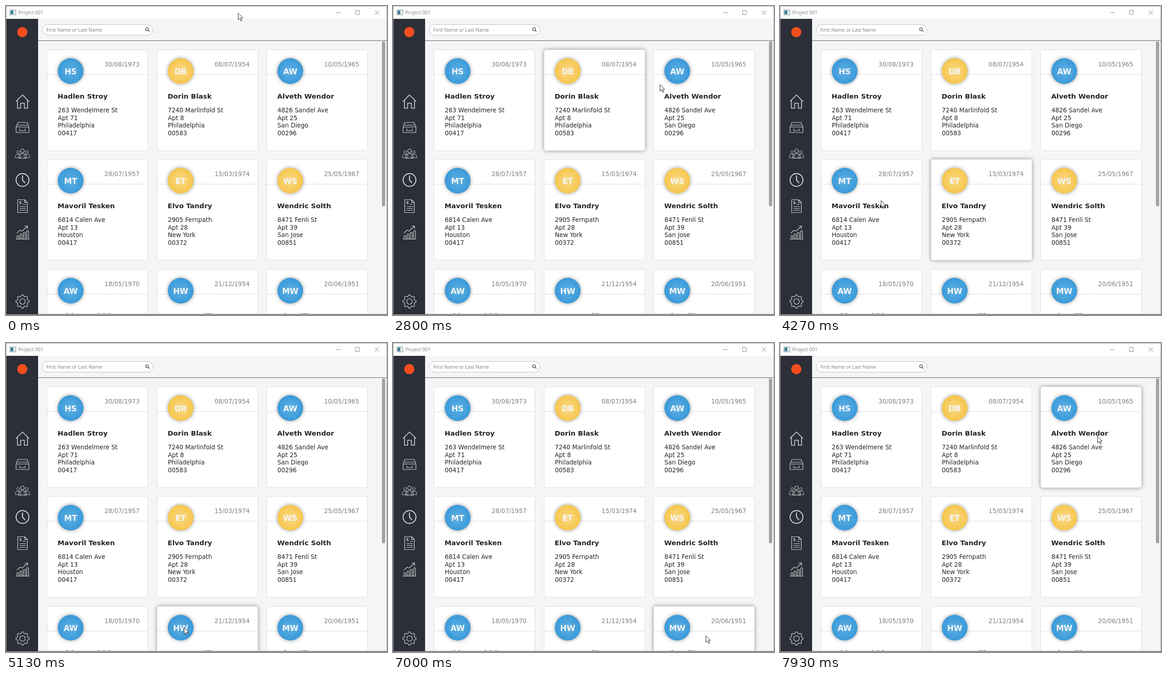
Animation of 831x674 px, one loop 8 s. Source, as an HTML page:

```html
<!DOCTYPE html>
<html lang="en">
<head>
<meta charset="utf-8">
<title>Project 001</title>
<style>
  html, body { margin: 0; width: 100%; height: 100%; overflow: hidden; background: #f4f5f7; }
  svg { display: block; }
  text { font-family: "DejaVu Sans", Verdana, sans-serif; }
  .ui { font: 10.5px "Open Sans", sans-serif; fill: #7c7c7c; }
  .panel { fill: #fff; stroke: #dcdde0; }
  .panel.hover { filter: drop-shadow(0 0 4px rgba(0, 0, 0, .4)); }
  .rule { stroke: #dcdde0; }
  .badge { filter: drop-shadow(0 0 4px rgba(0, 0, 0, .4)); }
  .initials { font-size: 17px; font-weight: bold; fill: #f4f5f7; text-anchor: middle; }
  .date { font-size: 13.3px; fill: #808080; text-anchor: end; }
  .name { font-size: 14.9px; font-weight: bold; fill: #23242a; }
  .address { font-size: 13.2px; fill: #23242a; }
  .icons { fill: none; stroke: #d8d9dc; stroke-width: 1.2; stroke-linecap: round; stroke-linejoin: round; }
  .icons .bold { stroke-width: 2; }
  .buttons { fill: none; stroke: #858585; }
</style>
</head>
<body>
<svg width="831" height="674" viewBox="0 0 831 674">
  <defs>
    <radialGradient id="blue"><stop stop-color="#5fb0e3"/><stop offset="1" stop-color="#3a9ad9"/></radialGradient>
    <radialGradient id="yellow"><stop stop-color="#fad986"/><stop offset="1" stop-color="#f6c64d"/></radialGradient>
    <clipPath id="content"><rect x="70" y="76" width="760" height="595"/></clipPath>
    <g id="person"><circle cy="-6" r="4"/><path d="M-8 10V7q0-7 8-7t8 7v3z"/></g>
  </defs>

  <rect width="831" height="674" fill="#f4f5f7"/>
  <g id="cards" clip-path="url(#content)"></g>
  <rect x="820" y="77" width="7" height="360" rx="3.5" fill="#a2a2a2"/>

  <!-- Title bar -->
  <rect width="831" height="28" fill="#fff"/>
  <rect x="8.5" y="8.5" width="13" height="11" fill="#e9eef0" stroke="#8b9296"/>
  <rect x="10" y="10" width="6" height="8" fill="#397f98"/>
  <text class="ui" x="27" y="18">Project 001</text>
  <path class="buttons" d="M720 14.5h10m32.5-5h8v9h-8zM804 9.5l9.5 9.5m0-9.5l-9.5 9.5"/>

  <!-- Search -->
  <path d="M70 75.5h760" stroke="#555a57"/>
  <rect x="79.5" y="40.5" width="241" height="23" rx="11.5" fill="#fff" stroke="#bcbdbf"/>
  <text class="ui" x="88" y="56">First Name or Last Name</text>
  <g fill="none" stroke="#444" stroke-width="1.3">
    <circle cx="307.7" cy="50.7" r="3.1"/><path d="M310 53l3 3"/>
  </g>

  <!-- Sidebar, each icon drawn around its own centre -->
  <rect y="28" width="70" height="644" fill="#2d2f38"/>
  <circle cx="35.5" cy="57" r="11" fill="#f24e1e"/>
  <g class="icons">
    <g transform="translate(36 208)"><path stroke-width="1.6" d="M-14 0L0-14 14 0M-11-2v17h7V4h8v11h7V-2"/></g>
    <g transform="translate(36 265)"><path d="M-14-1l4-10h20l4 10v12h-28zh28M-10-5h20M-6 3v4H6V3"/></g>
    <g transform="translate(36 322)">
      <use href="#person"/>
      <use href="#person" transform="translate(-9.500 1) scale(.75)"/>
      <use href="#person" transform="translate(9.500 1) scale(.75)"/>
    </g>
    <g transform="translate(36 379.500)" class="bold"><circle r="14"/><path d="M0-9V0l5 6"/></g>
    <g transform="translate(36 436.500)">
      <path d="M-10.500-14h15l6 6v22h-21zM4.500-14v6h6M1-4h6M-6 1H7M-6 5H7M-6 9H7M-3-10q-3-1-3 1t3 2-3 2"/>
    </g>
    <g transform="translate(36 494)"><path id="chart"/></g>
    <g transform="translate(36 644.500)"><circle r="6"/><path id="gear"/></g>
  </g>

  <!-- Window frame -->
  <path d="M.5 0v674M0 .5h831M830.5 0v674" stroke="#a6a6a6" fill="none"/>
  <path d="M0 672.5h831" stroke="#454745"/>
  <path d="M0 673.5h831" stroke="#c5c6c6"/>

  <path id="cursor" d="M.5.5V15l3.400-3.200 2.500 5.700 2.200-1L6.100 11h4.600z" fill="#fff" stroke="#24242c"/>
</svg>

<script>
const people = [
  ["Hadlen Stroy", "30/08/1973", "blue", "263 Wendelmere St", "Apt 71", "Philadelphia", "00417"],
  ["Dorin Blask", "08/07/1954", "yellow", "7240 Marlinfold St", "Apt 8", "Philadelphia", "00583"],
  ["Alveth Wendor", "10/05/1965", "blue", "4826 Sandel Ave", "Apt 25", "San Diego", "00296"],
  ["Mavoril Tesken", "28/07/1957", "blue", "6814 Calen Ave", "Apt 13", "Houston", "00417"],
  ["Elvo Tandry", "15/03/1974", "yellow", "2905 Fernpath", "Apt 28", "New York", "00372"],
  ["Wendric Solth", "25/05/1967", "yellow", "8471 Fenli St", "Apt 39", "San Jose", "00851"],
  ["Arlden Wolthims", "18/05/1970", "blue"],
  ["Hosten Wilk", "21/12/1954", "blue"],
  ["Mio Wilke", "20/06/1951", "blue"],
];
const size = 220, pitch = 239.5;
const cardLeft = i => 89.5 + Math.ceil(i % 3 * pitch);
const cardTop = i => 95.5 + Math.floor(Math.floor(i / 3) * pitch);

const cardMarkup = ([name, date, color, ...address], i) => {
  const initials = name.split(" ").map(word => word[0]).join("");
  const lines = address.map((line, n) =>
    `<text class="address" x="23.5" y="${136.5 + n * 16.6}">${line}</text>`).join("");
  return `<g transform="translate(${cardLeft(i)} ${cardTop(i)})">
    <rect class="panel" width="${size}" height="${size}" rx="4.5"/>
    <path class="rule" d="M0 54h${size}"/>
    <circle class="badge" cx="51.5" cy="46.5" r="28" fill="url(#${color})"/>
    <text class="initials" x="51.5" y="53">${initials}</text>
    <text class="date" x="202" y="36.5">${date}</text>
    <text class="name" x="23" y="106">${name}</text>${lines}</g>`;
};
const byId = id => document.getElementById(id);
byId("cards").innerHTML = people.map(cardMarkup).join("");

// Rising bars under an arrow
const bars = Array.from({ length: 4 }, (_, i) => `M${7 * i - 12} 14v${-7 - 3.5 * i}h4v${7 + 3.5 * i}`);
byId("chart").setAttribute("d", `M-14 14.5h28${bars.join("")}M-12 1l7-6 4 2 12-11m-6 0h6v6`);

// Eight-toothed gear outline
const gear = Array.from({ length: 32 }, (_, i) => {
  const angle = (i - 0.5) * Math.PI / 16, radius = i % 4 < 2 ? 14.5 : 11.5;
  return `${radius * Math.cos(angle)} ${radius * Math.sin(angle)}`;
});
byId("gear").setAttribute("d", `M${gear.join("L")}Z`);

// Pointer moves: start tick, end tick and destination, at 15 ticks per second
const start = [506, 15];
const moves = [
  [11, 21, 198, 165], [34, 37, 460, 171], [40, 44, 704, 171], [49, 53, 704, 419],
  [56, 60, 443, 419], [62, 64, 220, 424], [70, 74, 275, 618], [75, 77, 388, 620],
  [77, 83, 685, 412], [85, 88, 755, 380], [88, 94, 604, 430], [94, 98, 685, 415],
  [98, 105, 682, 638], [106, 111, 700, 630], [111, 119, 692, 203],
];
const smooth = p => p * p * (3 - 2 * p);
function pointerAt(tick) {
  let [x, y] = start;
  for (const [from, to, toX, toY] of moves) {
    const p = smooth(Math.min(1, Math.max(0, (tick - from) / (to - from))));
    x += (toX - x) * p;
    y += (toY - y) * p;
  }
  return [x, y];
}

const panels = document.querySelectorAll(".panel");
const inside = (value, edge) => value >= edge && value <= edge + size;

function draw() {
  const tick = Math.floor((performance.now() % 8000 + 4) * 15 / 1000);
  const [x, y] = pointerAt(tick).map(Math.round);
  byId("cursor").setAttribute("transform", `translate(${x} ${y})`);
  // The hover shadow trails the pointer by one tick
  const [hoverX, hoverY] = pointerAt(tick - 1);
  panels.forEach((panel, i) => panel.classList.toggle("hover",
    inside(hoverX, cardLeft(i)) && inside(hoverY, cardTop(i))));
  requestAnimationFrame(draw);
}
draw();
</script>
</body>
</html>
```
